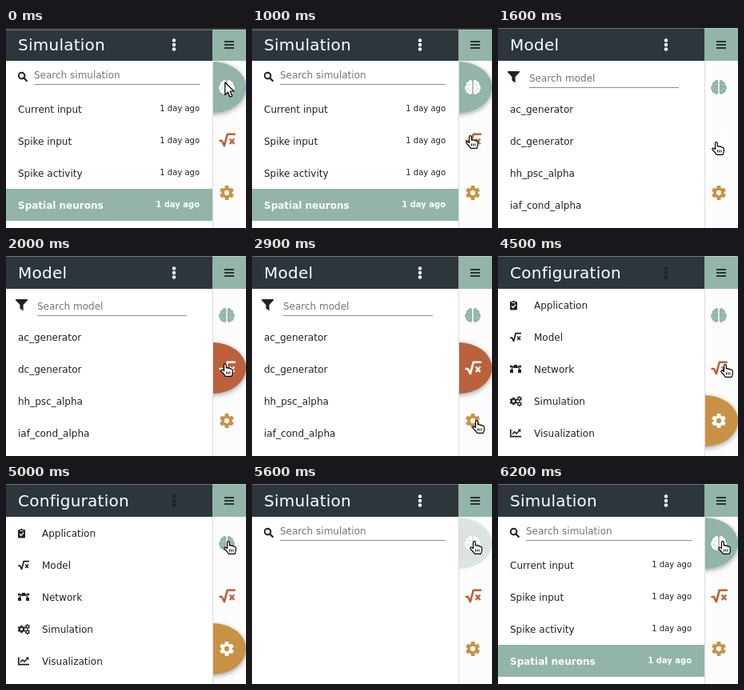
Write an HTML page with a canvas that moves like this. It is 300 by 250 pixels and loops after 6600 ms.

```html
<!DOCTYPE html>
<html lang="en">
<head>
<meta charset="utf-8">
<title>Side navigation</title>
<style>
html, body { margin: 0; width: 100%; height: 100%; overflow: hidden; background: #fff; }
canvas { display: block; width: 300px; height: 250px; }
</style>
</head>
<body>
<canvas id="stage" width="300" height="250"></canvas>
<script>
const ctx = document.getElementById('stage').getContext('2d');
const LOOP = 6600, STEP = 100;
const FONT = '"DejaVu Sans", Verdana, sans-serif';
const DARK = '#2d353d', INK = '#212121', GREEN = '#92b4a9', RUST = '#bb613c', GOLD = '#c99145';

// Pointer stops: time, x, y, shape (null hides it); linear in between.
const POINTER = [
  [0, 273, 67, 'arrow'],
  [100, 269, 70, 'hand'], [600, 269, 70, 'hand'], [1000, 267, 134, 'hand'],
  [1100, 267, 134, 'hand'], [1200, 267, 142, 'hand'], [1600, 267, 142, 'hand'],
  [2000, 268, 134, 'hand'], [2400, 268, 134, null],
  [2600, 266, 140, 'hand'], [2900, 275, 205, 'hand'], [4100, 275, 205, 'hand'],
  [4300, 277, 175, 'hand'], [4500, 278, 135, 'hand'], [5000, 272, 71, 'hand'],
  [5600, 272, 71, 'hand'], [6000, 275, 71, 'hand'], [LOOP, 275, 71, 'hand']
];

const clamp = v => Math.max(0, Math.min(1, v));
const ramp = (t, start, length) => clamp((t - start) / length);

function text(str, x, y, size, color, opt = {}) {
  ctx.font = `${opt.bold ? 'bold ' : ''}${size}px ${FONT}`;
  ctx.letterSpacing = (opt.spacing || 0) + 'px';
  ctx.textAlign = opt.align || 'left';
  ctx.fillStyle = color;
  ctx.fillText(str, x, y);
}

function rect(x, y, w, h, color) {
  ctx.fillStyle = color;
  ctx.fillRect(x, y, w, h);
}

function disc(x, y, r, color) {
  ctx.fillStyle = color;
  ctx.beginPath();
  ctx.arc(x, y, r, 0, 7);
  ctx.fill();
}

function fill(d, color) {
  ctx.fillStyle = color;
  ctx.fill(new Path2D(d));
}

function line(d, color, width) {
  ctx.strokeStyle = color;
  ctx.lineWidth = width;
  ctx.stroke(new Path2D(d));
}

function at(x, y, scale, draw) {
  ctx.save();
  ctx.translate(x, y);
  ctx.scale(scale, scale);
  draw();
  ctx.restore();
}

function gear(x, y, r, color) {
  ctx.beginPath();
  for (let i = 0; i < 6; i++) {
    const a = i * Math.PI / 3 - Math.PI / 2;
    for (const [da, k] of [[-.4, .72], [-.24, 1], [.24, 1], [.4, .72]])
      ctx.lineTo(x + r * k * Math.cos(a + da), y + r * k * Math.sin(a + da));
  }
  ctx.closePath();
  ctx.moveTo(x + r * .34, y);
  ctx.arc(x, y, r * .34, 0, 2 * Math.PI);
  ctx.fillStyle = color;
  ctx.fill('evenodd');
}

function root(x, y, scale, color) {
  at(x, y, scale, () => {
    ctx.lineJoin = 'round';
    line('M-10 1H-6.7L-3.6 7.2L.3 -7.3H10.3', color, 2.6);
    line('M3.2 -1.4L8.8 5M8.8 -1.4L3.2 5', color, 2.3);
  });
}

function brain(x, y, color, fold) {
  for (const side of [-1, 1]) {
    ctx.save();
    ctx.translate(x, y);
    ctx.scale(side, 1);
    fill('M.8 -7C.8 -9.4 4.6 -9.8 5.3 -6.8C7.6 -6.8 8.6 -4.6 7.8 -3C10.4 -1.4 10.6 2.4 8.6 3.6C9.2 6.2 7 7.6 5.6 7.3C4.6 9.6 .8 9.4 .8 6.8Z', color);
    line('M3 -4Q4 -2 6.2 -3M5 1.2Q7 .6 7.4 2.6M2.6 4Q4 3 5 4.6', fold, .7);
    ctx.restore();
  }
}

function bubble(y, color, alpha, shade) {
  if (alpha <= 0) return;
  ctx.save();
  ctx.beginPath();
  ctx.rect(259, 41, 41, 209);
  ctx.clip();
  ctx.globalAlpha = alpha;
  ctx.shadowColor = `rgba(0,0,0,${.36 * shade})`;
  ctx.shadowBlur = 6;
  ctx.shadowOffsetY = 2;
  ctx.fillStyle = color;
  ctx.beginPath();
  ctx.ellipse(258, y, 42, 32, 0, 0, 7);
  ctx.fill();
  ctx.restore();
}

function header(title, dots) {
  rect(0, 0, 258, 41, DARK);
  text(title, 15, 28, 20, '#fff', { spacing: .25 });
  for (const y of [15.5, 21, 26.5]) disc(210, y, 2.2, dots);
}

function simulationPage(listed) {
  header('Simulation', '#fff');
  ctx.lineCap = 'round';
  line('M22.8 63L25.8 66', INK, 2.4);
  ctx.lineCap = 'butt';
  line('M23.4 59.6A3.8 3.8 0 1 1 15.8 59.6A3.8 3.8 0 1 1 23.4 59.6', INK, 2);
  text('Search simulation', 35, 63, 12, '#747474');
  rect(35, 70, 207, 1, '#8c8c8c');
  if (!listed) return;
  rect(0, 201, 258, 40, GREEN);
  ['Current input', 'Spike input', 'Spike activity', 'Spatial neurons'].forEach((name, i) => {
    const bold = i === 3, color = bold ? '#fff' : INK, y = 106 + 40 * i;
    text(name, 15, y, 12, color, { bold });
    text('1 day ago', 242, y - 2, 10, color, { bold, align: 'right' });
  });
}

function modelPage(listed) {
  header('Model', '#fff');
  fill('M12.5 54H26.5Q27.6 54.6 26.8 55.6L21.6 61V68.6L17.4 65.6V61L12.2 55.6Q11.4 54.6 12.5 54Z', INK);
  text('Search model', 39, 67, 12, '#747474');
  rect(39, 74, 187, 1, '#8c8c8c');
  if (!listed) return;
  ['ac_generator', 'dc_generator', 'hh_psc_alpha', 'iaf_cond_alpha']
    .forEach((name, i) => text(name, 15, 106 + 40 * i, 12, INK));
}

function configPage() {
  header('Configuration', '#1b2228');
  ['Application', 'Model', 'Network', 'Simulation', 'Visualization']
    .forEach((name, i) => text(name, 45, 66 + 40 * i, 12, INK));
  // clipboard
  fill('M16 57H18Q19.5 54 21 57H23Q24 57 24 58V66.5Q24 67.5 23 67.5H16Q15 67.5 15 66.5V58Q15 57 16 57Z', INK);
  line('M17 62.5L18.8 64.4L22.2 60.6', '#fff', 1.4);
  rect(17.5, 58, 4, 1, '#fff');
  root(22, 101.5, .68, INK);
  // curve with handles
  line('M17 138H27M20 138.5Q17 139.5 17 143M24 138.5Q27 139.5 27 143', INK, 1.2);
  rect(20, 136, 4, 4, INK);
  rect(15, 142, 4, 4, INK);
  rect(25, 142, 4, 4, INK);
  disc(16.3, 138, 1.6, INK);
  disc(27.7, 138, 1.6, INK);
  gear(19.4, 181.5, 5, INK);
  gear(26.8, 178.3, 3.2, INK);
  gear(26.8, 184.9, 3.2, INK);
  // chart
  line('M15.8 216.5V225.7H29', INK, 1.7);
  line('M18 222.8L20.8 219.8L23 222L27 218', INK, 1.6);
  fill('M24.6 216.6H28.4V220.4Z', INK);
}

function pointer(t) {
  let i = POINTER.length - 1;
  while (POINTER[i][0] > t) i--;
  const [t0, x0, y0, shape] = POINTER[i];
  if (!shape) return;
  const next = POINTER[i + 1];
  let x = x0, y = y0;
  if (next && next[3] === shape) {
    const k = (t - t0) / (next[0] - t0);
    x += (next[1] - x0) * k;
    y += (next[2] - y0) * k;
  }
  at(Math.round(x), Math.round(y), 1, () => {
    ctx.lineJoin = 'round';
    const d = shape === 'arrow'
      ? 'M.8 1V16.6L4.4 13.2L7 19.2L9.8 18L7.2 12.2H12Z'
      : 'M4.5 9.5V2.2Q4.5 .7 5.9 .7Q7.3 .7 7.3 2.2V6Q9 5.2 10 6.4Q11.8 5.8 12.6 7.2Q15.3 6.8 15.3 9.2V12Q15.3 14 14 16.3H6.2Q4.5 13.4 1.2 10.3Q.2 8.6 1.7 8.1Q3 7.9 4.5 9.5Z';
    fill(d, '#fff');
    line(d, '#000', 1.2);
    if (shape === 'hand') line('M7.5 10.5V13.5M9.7 10.5V13.5M11.9 10.5V13.5', '#000', 1);
  });
}

function sidebar(t, page) {
  rect(258, 41, 42, 209, '#fcfcfc');
  rect(258, 41, 1, 209, '#dcdcdc');
  rect(258, 0, 42, 41, GREEN);
  for (const y of [16, 20, 24]) rect(273, y, 12, 2, '#2b3434');

  const brainOn = page === 'simulation', rootOn = page === 'model', gearOn = page === 'config';
  if (brainOn) {
    const a = t < 1500 ? 1 : ramp(t, 5500, 360);
    bubble(74, GREEN, a, a);
  }
  if (rootOn) {
    const a = ramp(t, 1600, 400);
    bubble(140, RUST, a, a);
  }
  if (gearOn) {
    const a = t < 3500 ? .28 : .8 + .2 * ramp(t, 3600, 400);
    bubble(206, GOLD, a, ramp(t, 3600, 300));
  }
  brain(276, 74, brainOn ? '#fff' : GREEN, brainOn ? GREEN : '#c9dad4');
  root(276.5, 140, 1, rootOn ? '#fff' : RUST);
  gear(276, 206, 9.2, gearOn ? '#fff' : GOLD);
}

function draw(t) {
  const page = t < 1500 || t >= 5500 ? 'simulation' : t < 3400 ? 'model' : 'config';
  rect(0, 0, 300, 250, '#fff');
  if (page === 'simulation') simulationPage(t < 1500 || t >= 5700);
  else if (page === 'model') modelPage(t >= 1600);
  else configPage();
  sidebar(t, page);
  rect(0, 0, 300, 1, 'rgba(255,255,255,.3)');
  if (t < 1500) {
    rect(0, 0, 300, 2, '#353b34');
    rect(0, 2, 300, 1, 'rgba(255,255,255,.3)');
  }
  pointer(t);
}

const begin = performance.now();
function tick() {
  const t = (performance.now() - begin) % LOOP;
  draw(Math.floor(t / STEP) * STEP);
  requestAnimationFrame(tick);
}
tick();
</script>
</body>
</html>
```
